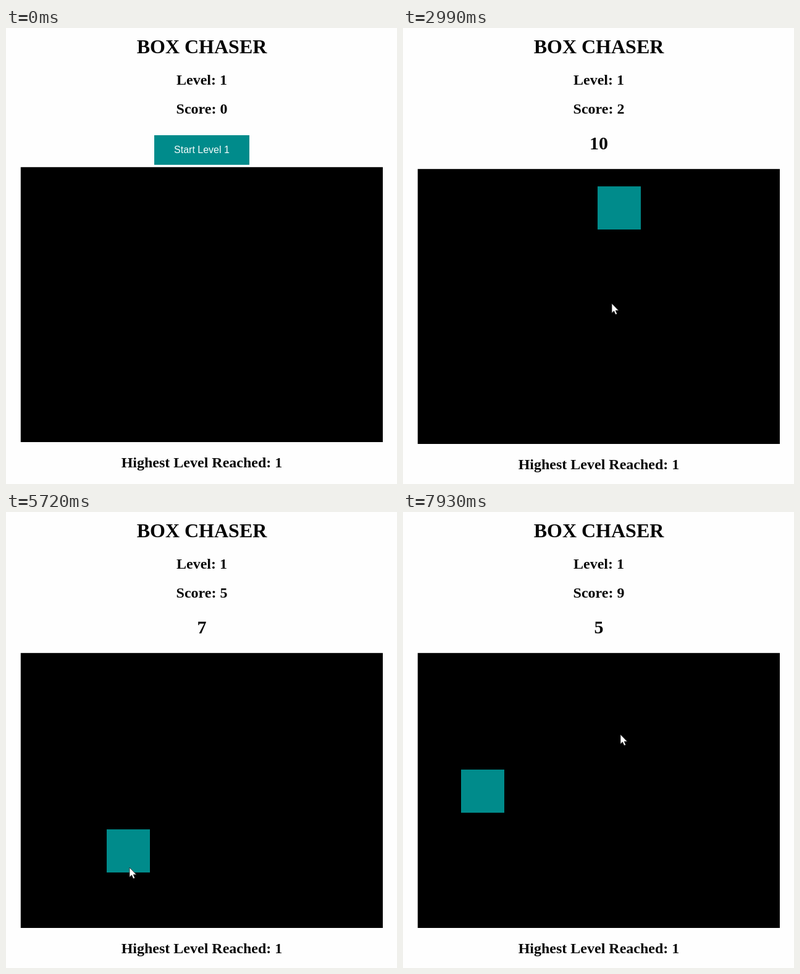
Recreate the animation shown at these times as an HTML page. Size 633x740 px, loop 8000 ms.

```html
<!DOCTYPE html>
<html>
<head>
<meta charset="utf-8">
<title>Box Chaser</title>
<style>
  html, body { margin: 0; height: 100%; overflow: hidden; background: #fefefe; }
  svg { display: block; width: 633px; height: 740px; filter: blur(.35px); }
  text { text-anchor: middle; font: bold 24px "Liberation Serif", "Times New Roman", serif; fill: #080808; }
  #title { font-size: 32px; }
  #count { font-size: 30px; }
  #button text { font: 16px "Liberation Sans", Arial, sans-serif; fill: #f4fbfb; }
  .teal { fill: #008b8b; }
  #arrow, #hand { fill: #fff; stroke: #222; stroke-width: .8; stroke-linejoin: round; }
  #hand { stroke: #666; }
</style>
</head>
<body>
<svg viewBox="0 0 633 740">
  <text id="title" x="317" y="41">BOX CHASER</text>
  <text x="317" y="92">Level: 1</text>
  <text id="score" x="317" y="139"></text>
  <text id="count" x="317" y="197"></text>
  <g id="button">
    <rect class="teal" x="240" y="174" width="154" height="48"/>
    <text x="317" y="203">Start Level 1</text>
  </g>
  <g id="board">
    <rect x="23.8" y="225.8" width="586.2" height="446.2"/>
    <text x="317" y="713">Highest Level Reached: 1</text>
  </g>
  <rect id="box" class="teal" width="70" height="70"/>
  <path id="arrow" d="M0 0V15.5L3.5 12.3 6 18 8.6 17 6.2 11.4H11Z"/>
  <path id="hand" d="M-3.5 14V1Q-2-1.5-.5 1V8Q1 6.5 2.5 8.3 4.3 7.2 5.7 9 8.2 8.5 8.2 11V16Q8 18.5 6.5 20.5V22.5H-2.5V20.5L-7.5 13.5Q-7.5 11-5.5 12ZM-.5 8V12M2.5 8.3V12M5.7 9V12"/>
</svg>
<script>
const LOOP = 8000, STEP = 130, START = 1040, LAST = 7930;
const $ = id => document.getElementById(id);

// box corner for each score, and where in the box it gets clicked if off centre
const boxes = [
  [24, 229], [305, 415], [315, 257], [436, 274, 18, 35], [262, 400],
  [163, 515, 37, 62], [462, 578, 18, 36], [363, 403], [302, 309, 50, 52], [94, 418]
];
const clicks = [[205, 440], [312, 204],
  ...boxes.map(([x, y, dx = 33, dy = 32]) => [x + dx, y + dy])];

// hits come a little faster as the round goes on
const hits = boxes.map((_, k) => START + (LAST - START) * (k / 9) ** .9);
const times = [0, ...hits, LOOP + START];

// rest after a click, glide to the next target, rest until it is clicked
function pointer(t) {
  const i = times.findIndex(s => s > t) - 1;
  const [x0, y0] = clicks[i], [x1, y1] = clicks[i + 1];
  const p = (t - times[i]) / (times[i + 1] - times[i]);
  const q = Math.min(1, Math.max(0, (p - .32) / .4)), e = q * q * (3 - 2 * q);
  return [x0 + (x1 - x0) * e, y0 + (y1 - y0) * e];
}

const show = (id, on) => $(id).style.display = on ? "" : "none";
const place = (id, x, y) => $(id).setAttribute("transform", `translate(${x} ${y})`);

function draw(now) {
  const t = Math.floor(now % LOOP / STEP) * STEP;
  const playing = t >= START;
  const score = Math.max(0, hits.filter(h => h <= t + .01).length - 1);
  const [x, y] = pointer(t);
  const hand = y < 222;

  $("score").textContent = "Score: " + score;
  $("count").textContent = playing ? 10 - Math.max(0, Math.floor((t - 2050) / 1000)) : "";
  show("button", !playing);
  show("box", playing);
  place("board", 0, playing ? 3 : 0);
  place("box", boxes[score][0], boxes[score][1]);
  show("hand", hand);
  show("arrow", t >= STEP && !hand);
  place("hand", x, y);
  place("arrow", x, y);
  requestAnimationFrame(draw);
}
requestAnimationFrame(draw);
</script>
</body>
</html>
```
